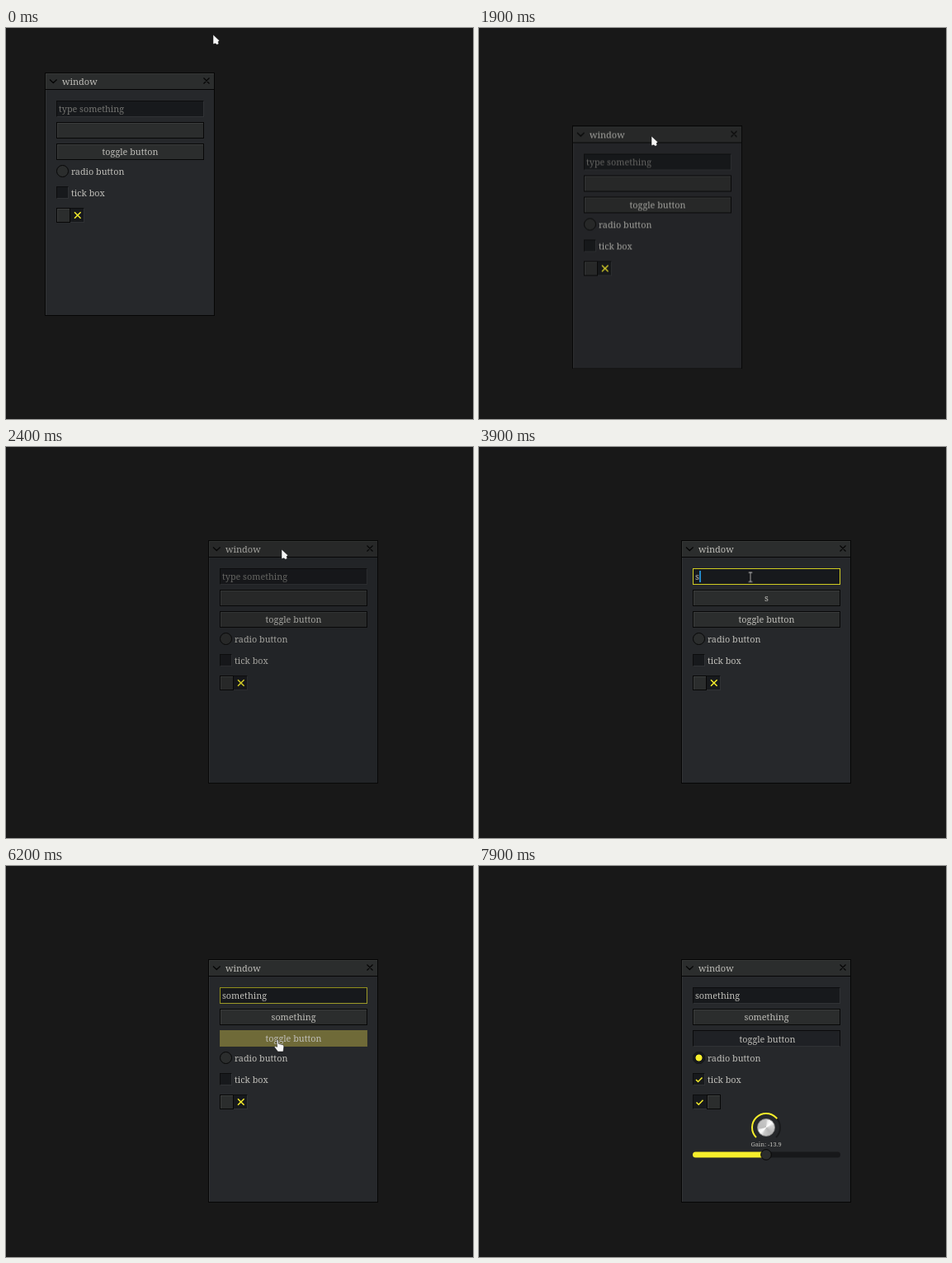
Write an HTML page that moves like this. It is 566x474 px and loops after 8 s.

```html
<!DOCTYPE html>
<html lang="en">
<head>
<meta charset="utf-8">
<title>Widget window</title>
<style>
  :root {
    --yellow: #f6ee2c;
    --panel: #2b2d2d;
    --well: #17191c;
    --ink: #bfbeb9;
  }
  html, body { margin: 0; width: 100%; height: 100%; overflow: hidden; }
  body { background: #181818; }
  #stage {
    position: relative; width: 566px; height: 474px; overflow: hidden;
    font: 500 10.8px/20px "Noto Serif", serif; color: var(--ink); white-space: nowrap;
  }
  #stage * { box-sizing: border-box; }
  #stage div, #stage svg { position: absolute; }
  #stage svg { left: 0; top: 0; overflow: visible; fill: none; }
  .anim { animation: 8s step-end infinite; }

  #win {
    left: 47px; top: 54px; width: 206px; height: 295px;
    background: #26282b; border: 1px solid #060606;
    box-shadow: inset 1px 1px #323436;
    animation-name: drag;
  }
  /* children are placed from the outer corner of the window */
  #face { left: -1px; top: -1px; width: 206px; height: 295px; }
  #title {
    left: 1px; top: 1px; width: 204px; height: 20px; padding-left: 20px;
    background: var(--panel); border-bottom: 1.5px solid #050505;
    box-shadow: inset 1px 1px #363837; font-size: 11px;
  }
  .row { left: 14px; width: 179px; height: 20px; }
  .btn {
    background: var(--panel); border: 1px solid #070707; text-align: center;
    box-shadow: inset 1px 1px #3a3c3c;
  }
  .btn > div { left: 0; right: 0; top: -1px; }
  .well { background: var(--well); border: 1px solid; border-color: #0c0d0e #303235 #303235 #0c0d0e; }
  .label { left: 32px; }

  #input { top: 34px; }
  #input > div { left: 2px; top: -1px; }
  #hint { color: #747471; animation-name: hint; }
  #caret {
    display: inline-block; width: 2px; height: 14px; vertical-align: -3px;
    background: #2388c8; animation-name: caret;
  }
  #input #ring { inset: -1px; border: 1px solid #d0cc22; animation-name: ring; }
  #echo { top: 60px; }
  #toggle { top: 86px; }
  #toggle #hover { inset: 0; background: #35373a; animation-name: hover; }
  #toggle #sunk { inset: -1px; background: #1f2125; border: 1px solid #0a0a0b; border-bottom-color: #303235; animation-name: sunk; }
  #toggle #flash { inset: -1px; background: #77723a; animation-name: flash; }
  #toggle #caption { animation-name: press; }

  #radio { left: 14px; top: 112px; width: 15px; height: 15px; border-radius: 50%; background: var(--panel); border: 1px solid #070707; }
  #radioOn { inset: -1px; border-radius: 50%; background: radial-gradient(var(--yellow) 3.6px, var(--well) 4.4px); animation-name: radio; }
  #tick { left: 14px; top: 138px; width: 15px; height: 15px; }
  .mark { stroke: var(--yellow); stroke-width: 1.5; }
  #tickMark { animation-name: tick; }
  #switch { left: 14px; top: 164px; width: 34px; height: 18px; }
  #thumb { left: -1px; top: -1px; width: 17px; height: 18px; animation-name: thumb; }
  #crossMark { animation-name: cross; }
  #checkMark { animation-name: check; }

  #extra { left: 0; top: 0; width: 206px; height: 295px; animation-name: reveal; }
  #cap {
    left: 92px; top: 193px; width: 22px; height: 22px; border-radius: 50%;
    border: 1px solid #8d8d8d;
    background: conic-gradient(from 50deg, #fff, #d4d4d4 25deg, #b4b4b4 90deg, #c9c9c9 150deg, #fff 178deg, #f4f4f4 200deg, #bcbcbc 215deg, #c6c6c6 310deg, #ededed 325deg, #fff);
  }
  #gain { left: 53px; top: 214px; width: 100px; text-align: center; font-size: 7.4px; }

  #cursor { left: 0; top: 0; animation-name: cursor; }
  #cursor svg { fill: #f6f6f6; stroke: #111; stroke-width: .5; }
  #arrow { animation-name: arrow; }
  #beam { animation-name: beam; }
  #hand { animation-name: hand; }

  @keyframes drag {
    0%     { transform: none; opacity: 1; }
    21.25% { transform: translate(14px, 22px); opacity: .84; }
    22.5%  { transform: translate(38px, 50px); opacity: .82; }
    23.75% { transform: translate(66px, 64.5px); opacity: .82; }
    25%    { transform: translate(93px, 69px); opacity: .82; }
    26.25% { transform: translate(124px, 68px); opacity: .82; }
    27.5%  { transform: translate(155px, 65px); opacity: .82; }
    28.75% { transform: translate(182px, 61px); opacity: .82; }
    30%    { transform: translate(198px, 59px); opacity: .84; }
    31.25%, 100% { transform: translate(198px, 59px); opacity: 1; }
  }
  @keyframes cursor {
    0%     { transform: translate(251px, 8px); }
    12.5%  { transform: translate(238px, 13px); }
    13.75% { transform: translate(198px, 33px); }
    15%    { transform: translate(152px, 57px); }
    16.25% { transform: translate(136px, 65px); }
    21.25% { transform: translate(154px, 92px); }
    22.5%  { transform: translate(181px, 119px); }
    23.75% { transform: translate(209px, 131px); }
    25%    { transform: translate(236px, 134px); }
    26.25% { transform: translate(267px, 132px); }
    27.5%  { transform: translate(297px, 129px); }
    28.75% { transform: translate(322px, 126px); }
    30%    { transform: translate(334px, 124px); }
    32.5%  { transform: translate(302px, 226px); }
    33.75% { transform: translate(269px, 275px); }
    35%    { transform: translate(325px, 151.5px); }
    71.25% { transform: translate(325px, 174px); }
    72.5%  { transform: translate(325px, 196px); }
    73.75% { transform: translate(325px, 210px); }
    82.5%  { transform: translate(312px, 216px); }
    83.75% { transform: translate(290px, 223px); }
    85%    { transform: translate(269px, 229px); }
    86.25% { transform: translate(262px, 232px); }
    88.75% { transform: translate(262px, 257px); }
    91.25% { transform: translate(262px, 284px); }
    93.75%, 100% { transform: translate(318px, 336px); }
  }
  @keyframes arrow { 0% { opacity: 1; } 35%, 100% { opacity: 0; } }
  @keyframes beam  { 0% { opacity: 0; } 35% { opacity: 1; } 71.25%, 100% { opacity: 0; } }
  @keyframes hand  { 0% { opacity: 0; } 71.25% { opacity: 1; } 95%, 100% { opacity: 0; } }
  @keyframes hint  { 0% { opacity: 1; } 37.5%, 100% { opacity: 0; } }
  @keyframes caret { 0% { opacity: 0; } 37.5% { opacity: 1; } 77.5%, 100% { opacity: 0; } }
  @keyframes ring {
    0% { opacity: 0; } 37.5% { opacity: .35; } 38.75% { opacity: .7; } 40% { opacity: 1; }
    77.5% { opacity: .68; } 78.75% { opacity: .35; } 80%, 100% { opacity: 0; }
  }
  @keyframes hover { 0% { opacity: 0; } 72.5% { opacity: .5; } 73.75% { opacity: 1; } 77.5%, 100% { opacity: 0; } }
  @keyframes flash {
    0% { opacity: 0; } 77.5% { opacity: .9; } 78.75% { opacity: .6; } 80% { opacity: .35; }
    81.25% { opacity: .15; } 82.5%, 100% { opacity: 0; }
  }
  @keyframes sunk  { 0% { opacity: 0; } 78.75%, 100% { opacity: 1; } }
  @keyframes press { 0% { transform: none; } 78.75%, 100% { transform: translate(1px, 1px); } }
  @keyframes reveal { 0% { opacity: 0; } 78.75% { opacity: .35; } 80% { opacity: .7; } 81.25%, 100% { opacity: 1; } }
  @keyframes radio { 0% { opacity: 0; } 86.25% { opacity: .5; } 87.5%, 100% { opacity: 1; } }
  @keyframes tick  { 0% { opacity: 0; } 90%, 100% { opacity: 1; } }
  @keyframes thumb { 0% { transform: none; } 92.5%, 100% { transform: translate(17px); } }
  @keyframes cross { 0% { opacity: 1; } 92.5%, 100% { opacity: 0; } }
  @keyframes check { 0% { opacity: 0; } 92.5%, 100% { opacity: 1; } }
</style>
</head>
<body>
<div id="stage">
  <div id="win" class="anim"><div id="face">
    <div id="title">window</div>
    <svg width="206" height="20" stroke="#050505" stroke-width="1.3">
      <path d="M6 8.500l4.300 4 4.300-4M192.500 6.500l7 7m0-7l-7 7"/>
    </svg>

    <div id="input" class="row well">
      <div id="hint" class="anim">type something</div>
      <div><span id="typed"></span><i id="caret" class="anim"></i></div>
      <div id="ring" class="anim"></div>
    </div>
    <div id="echo" class="row btn"><div id="echoed"></div></div>
    <div id="toggle" class="row btn">
      <div id="hover" class="anim"></div>
      <div id="sunk" class="anim"></div>
      <div id="flash" class="anim"></div>
      <div id="caption" class="anim">toggle button</div>
    </div>

    <div id="radio"><div id="radioOn" class="anim"></div></div>
    <div class="label" style="top:110px">radio button</div>
    <div id="tick" class="well">
      <svg id="tickMark" class="mark anim" width="13" height="13"><path d="M3 7l2.500 2.500 5-5"/></svg>
    </div>
    <div class="label" style="top:136px">tick box</div>
    <div id="switch" class="well">
      <svg id="crossMark" class="mark anim" width="32" height="16"><path d="M21 4.200l7.600 7.600m0-7.600l-7.600 7.600"/></svg>
      <svg id="checkMark" class="mark anim" width="32" height="16"><path d="M3.500 8.500l2.700 2.700 5.300-5.500"/></svg>
      <div id="thumb" class="btn anim"></div>
    </div>

    <div id="extra" class="anim">
      <svg width="206" height="295" stroke-width="2">
        <path d="M91 216a17 17 0 1 1 24 0" stroke="#191a1c"/>
        <path id="arc" d="M91 216a17 17 0 1 1 24 0" stroke="#f6ee2c" pathLength="100"/>
        <g stroke-width="7" stroke-linecap="round">
          <path d="M17.500 237H189.500" stroke="#17181a"/>
          <path d="M17.500 237H103" stroke="#f6ee2c"/>
        </g>
        <circle cx="103" cy="237" r="6.300" fill="#2b2d2d" stroke="#070707" stroke-width="1"/>
      </svg>
      <div id="cap"></div>
      <div id="gain"></div>
    </div>
  </div></div>

  <div id="cursor" class="anim">
    <svg id="arrow" class="anim" width="8" height="13"><path d="M0 0l7.700 7.300-1.700 1.500 1 2.300-2.200 1.200-1.900-1.500L0 11.500z"/></svg>
    <svg id="beam" class="anim" width="8" height="13"><path d="M1.500 0h5v1.200h-1.900v10.100h1.900v1.200h-5v-1.200h1.900V1.200H1.500z"/></svg>
    <svg id="hand" class="anim" width="12" height="15"><path d="M3 1q1-1.200 2 0l.4 4.500 5.100 1.300q1.500.5 1.300 2.200L11 15H4.500L.3 9.500Q1 7.800 3.600 9.300z"/></svg>
  </div>
</div>
<script>
  const LOOP = 8000, WORD = "something";
  // each pair: time in ms, letters typed so far
  const KEYS = [[3900, 1], [4100, 3], [4200, 4], [4400, 5], [4500, 6], [4700, 7], [4800, 8], [5600, 9]];
  const el = id => document.getElementById(id);
  const typed = el("typed"), echoed = el("echoed"), gain = el("gain"), arc = el("arc");
  let start;

  function setText(node, text) {
    if (node.textContent !== text) node.textContent = text;
  }

  function draw(t) {
    const count = KEYS.reduce((n, [at, len]) => t >= at ? len : n, 0);
    const text = WORD.slice(0, count);
    setText(typed, text);
    setText(echoed, text);

    const turn = Math.max(0, Math.min(4, Math.floor(t / 100) - 75)) / 4;
    const value = 0.5 + 0.19 * turn;
    setText(gain, "Gain: " + (66.8 * value - 60).toFixed(1));
    arc.setAttribute("stroke-dasharray", value * 100 + " 200");
  }

  function tick(now) {
    start ??= now;
    draw((now - start) % LOOP);
    requestAnimationFrame(tick);
  }
  draw(0);
  requestAnimationFrame(tick);
</script>
</body>
</html>
```
